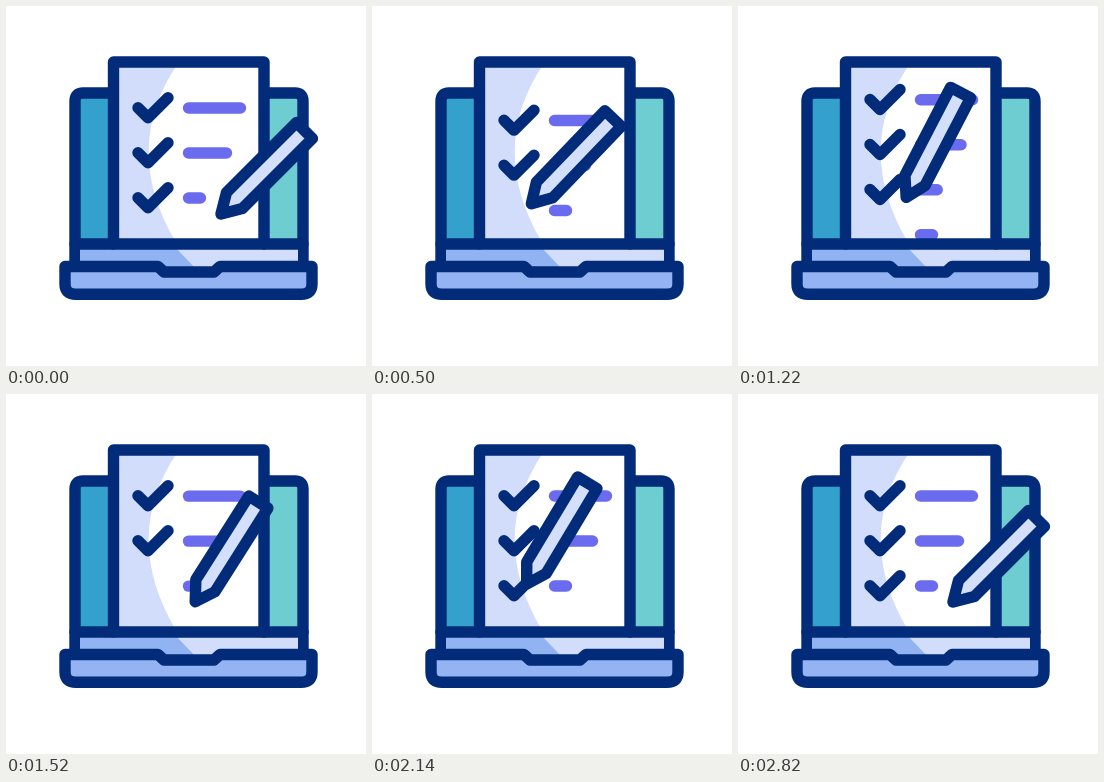
Animation, 360 px wide and 360 px high, one loop 3 s. Source, as an HTML page:

```html
<!DOCTYPE html>
<html lang="en">
<head>
<meta charset="utf-8">
<title>Checklist</title>
<style>
html, body { margin: 0; width: 100%; height: 100%; overflow: hidden; background: #fff; }
svg { display: block; width: 100vw; height: 100vh; }
.line { stroke: #022c7a; stroke-width: 11.4; stroke-linecap: round; stroke-linejoin: round; }
.bar { stroke: #6b6bf0; stroke-width: 11.4; stroke-linecap: round; }
</style>
</head>
<body>
<svg viewBox="0 0 360 360" fill="none">
  <clipPath id="page"><rect x="112" y="60" width="142" height="176"/></clipPath>
  <path d="M69 238V95Q69 87 77 87H183V238Z" fill="#33a1cb"/>
  <path d="M183 238V87H289Q297 87 297 95V238Z" fill="#6dcdd0"/>
  <path class="line" d="M69 260V95Q69 87 77 87H289Q297 87 297 95V260"/>
  <path d="M107.5 56H258V238H107.5Z" fill="#fff"/>
  <path d="M107.5 56H173C135 110 131 172 171 238H107.5Z" fill="#d2dcfb"/>
  <path d="M74 241H292V262H74Z" fill="#d2dcfb"/>
  <path d="M74 241H169L189 262H74Z" fill="#92b3f1"/>
  <g id="rows" clip-path="url(#page)"></g>
  <path class="line" d="M107.5 238V56H258V238"/>
  <path class="line" d="M69 238H297"/>
  <path class="line" d="M59 260.5H152L158 266H208L214 260.5H306V278Q306 288.3 295 288.3H70Q59 288.3 59 278Z" fill="#94b3f3"/>
  <path id="pen" class="line" d="M0 0L19 -11.3H118V11.3H19Z" fill="#d4dffb"/>
</svg>
<script>
const LOOP = 3000, GAP = 45, BOW = 4;
const WIDTHS = [52, 38, 12, 12];
// Pen poses: tip x, tip y, angle
const REST = [215, 208, 45], START = [133.5, 188, 46.7], LOW = [143, 204, 50],
  END = [161, 182.5, 64], AWAY = [191, 208, 58];
const SCROLLS = [[220, 650], [1104, 1534]];
const STROKES = [[670, 1100], [1870, 2265]];
const TRIPS = [
  [220, 670, REST, START],
  [1100, 1480, END, AWAY],
  [1480, 1870, AWAY, START],
  [2265, 2806, END, REST]
];

const clamp = x => Math.min(1, Math.max(0, x));
const ease = (t, a, b) => { const k = clamp((t - a) / (b - a)); return k * k * (3 - 2 * k); };
const mix = (a, b, k) => a + (b - a) * k;
const blend = (p, q, k) => p.map((v, i) => mix(v, q[i], k));
const within = (t, list) => list.find(([a, b]) => t >= a && t < b);

function add(tag, parent, attrs) {
  const el = document.createElementNS("http://www.w3.org/2000/svg", tag);
  for (const key in attrs) el.setAttribute(key, attrs[key]);
  return parent.appendChild(el);
}

const pen = document.getElementById("pen");
const rows = WIDTHS.map(() => {
  const g = add("g", document.getElementById("rows"), {});
  return {
    g,
    bar: add("path", g, { class: "bar" }),
    check: add("path", g, { class: "line", d: "M132 -.3L142 9.7L162 -10.3", pathLength: 3 })
  };
});

function barWidth(place) {
  const p = Math.max(0, place), i = Math.min(2, Math.floor(p));
  return mix(WIDTHS[i], WIDTHS[i + 1], p - i);
}

function penAt(t) {
  const stroke = within(t, STROKES);
  if (stroke) {
    const k = 3 * ease(t, ...stroke);
    return k < 1 ? blend(START, LOW, k) : blend(LOW, END, (k - 1) / 2);
  }
  const trip = within(t, TRIPS);
  if (!trip) return REST;
  const [a, b, from, to] = trip, k = ease(t, a, b);
  const pose = blend(from, to, k);
  pose[1] += BOW * Math.sin(Math.PI * k);
  return pose;
}

// Length of the third check, 0 to 1; it is cleared once a scroll ends.
function checkAt(t) {
  const stroke = within(t, STROKES);
  if (stroke) return Math.max(.001, ease(t, ...stroke));
  return SCROLLS.some(([, end], i) => t >= end && t < STROKES[i][0]) ? 0 : 1;
}

function draw(t) {
  const scroll = within(t, SCROLLS);
  const s = scroll ? ease(t, ...scroll) : 0;
  const done = checkAt(t);
  rows.forEach(({ g, bar, check }, i) => {
    const place = i - s;
    g.setAttribute("transform", `translate(0 ${102 + GAP * place})`);
    g.setAttribute("opacity", i === 0 ? 1 - clamp((s - .2) / .35) : i === 3 && !s ? 0 : 1);
    bar.setAttribute("d", `M182.5 0h${barWidth(place)}`);
    const k = i < 2 ? 1 : i === 2 ? done : 0;
    check.setAttribute("visibility", k ? "visible" : "hidden");
    check.setAttribute("stroke-dasharray", k === 1 ? "none" : `${3 * k} 9`);
  });
  const [x, y, angle] = penAt(t);
  pen.setAttribute("transform", `translate(${x} ${y}) rotate(${-angle})`);
}

function tick() {
  draw(performance.now() % LOOP);
  requestAnimationFrame(tick);
}
tick();
</script>
</body>
</html>
```
